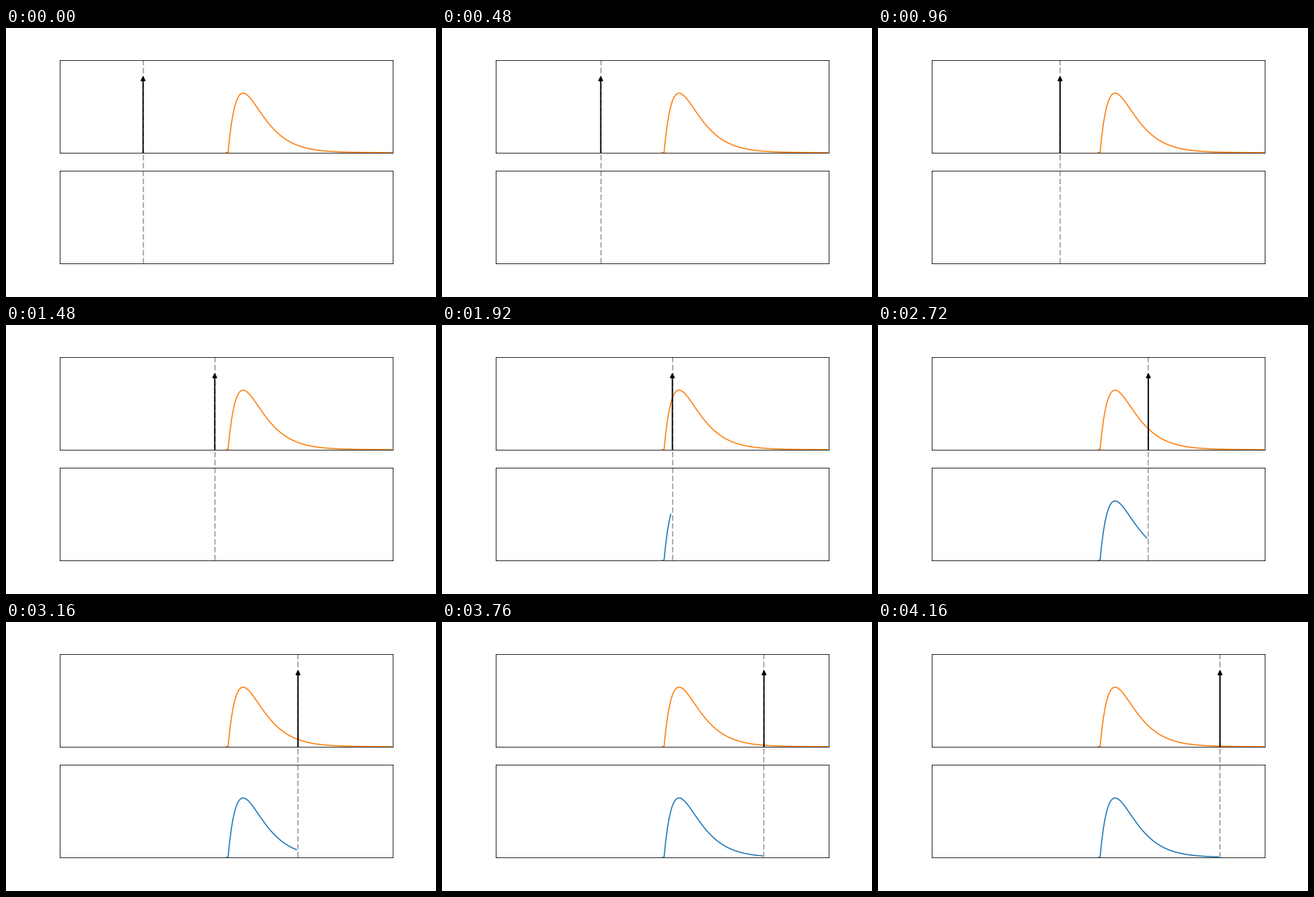
Write a matplotlib script that moves like this. It is 576x360 px and loops after 4200 ms.

```python
import numpy as np
import matplotlib.pyplot as plt
from matplotlib.animation import FuncAnimation

FRAMES, INTERVAL = 105, 40
STEP, START = 0.1, -5.0

t = np.arange(100) * STEP
tau = np.clip((t - 0.1) / 0.9, 0, None)
response = 0.773 * tau * np.exp(1 - tau)

fig, (top, bottom) = plt.subplots(2, 1, figsize=(8, 5), dpi=72)
fig.subplots_adjust(left=0.125, right=0.9, bottom=0.125, top=0.88, hspace=0.2)
for ax in (top, bottom):
    ax.set(xlim=(-10, 10), ylim=(0, 1.2), xticks=[], yticks=[])
bottom.patch.set_visible(False)

# The marker spans both panels and the gap between them.
marker = top.axvline(START, ymin=-1.2, ymax=1, color="gray", alpha=0.6,
                     ls="--", lw=2, clip_on=False, zorder=1)
top.plot(t, response, color="tab:orange", lw=1.5)
output, = bottom.plot([], [], color="tab:blue", lw=1.5)
impulse = top.annotate("", xy=(START, 1), xytext=(START, 0),
                       arrowprops=dict(arrowstyle="-|>", color="black", lw=1.7,
                                       shrinkA=0, shrinkB=0, mutation_scale=12))


def update(n):
    # The sweep advances six samples every five ticks.
    k = max(0, 6 * n // 5 - 1)
    x = START + k * STEP
    marker.set_xdata([x, x])
    impulse.xy = (x, 1)
    impulse.set_position((x, 0))
    shown = max(0, k - 50)
    output.set_data(t[:shown], response[:shown])
    return marker, impulse, output


anim = FuncAnimation(fig, update, frames=FRAMES, interval=INTERVAL,
                     repeat=True, repeat_delay=0)
plt.show()
```
